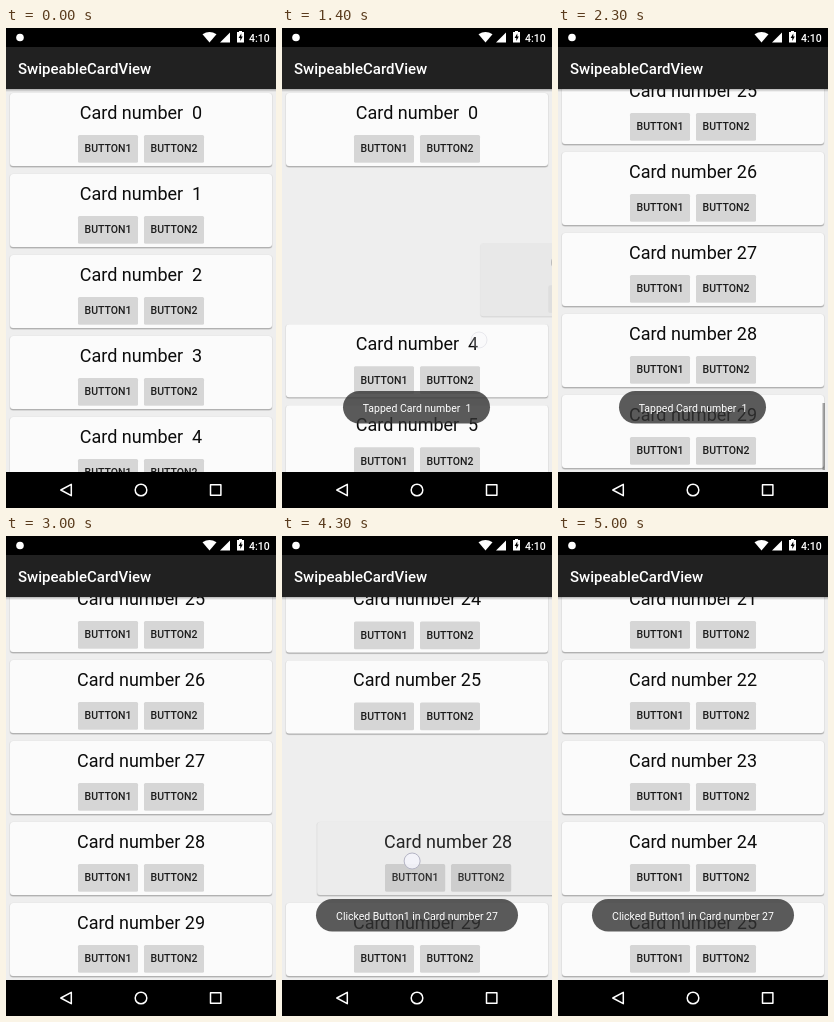
Recreate the animation shown at these times as an HTML page. Size 270 px wide and 480 px high, loop 5.3 s.

```html
<!DOCTYPE html>
<html lang="en">
<head>
<meta charset="utf-8">
<title>SwipeableCardView</title>
<style>
  html, body { margin: 0; width: 100%; height: 100%; overflow: hidden; background: #eee; }
  svg { display: block; width: 270px; height: 480px; }
  text { font-family: Roboto, "Noto Sans", sans-serif; white-space: pre; }
  .mid { text-anchor: middle; }
  .name { font-size: 18px; fill: #0c0c0c; }
  .btn { font-size: 10.5px; font-weight: 500; fill: #1c1c1c; }
  .bar { font-weight: 500; fill: #fff; }
  .toast { font-size: 10.5px; fill: #fff; }
</style>
</head>
<body>
<svg viewBox="0 0 270 480">
  <defs>
    <clipPath id="view"><rect y="61" width="270" height="383"/></clipPath>
    <linearGradient id="shade" x2="0" y2="1">
      <stop stop-opacity=".28"/><stop offset="1" stop-opacity="0"/>
    </linearGradient>
  </defs>
  <rect width="270" height="480" fill="#eee"/>
  <g clip-path="url(#view)">
    <g id="list"></g>
    <rect id="thumb" x="264.5" width="2.5" height="67" fill-opacity=".35"/>
  </g>

  <rect y="61" width="270" height="3" fill="url(#shade)"/>
  <rect y="19" width="270" height="42" fill="#212121"/>
  <text class="bar" x="12" y="46" font-size="15">SwipeableCardView</text>

  <rect width="270" height="19"/>
  <g fill="#fff">
    <circle cx="14" cy="9.5" r="3.8"/>
    <path d="M203.5 14.5 196.5 6.3Q203.5 1.6 210.5 6.3Z"/>
    <path d="M224 4.5V14.5H214Z"/>
    <path d="M233 4V3H236V4H238V14.5H231V4Z"/>
    <path d="M235.3 5.5 232.6 10H234.3V13L236.8 8.6H235.3Z" fill="#000"/>
  </g>
  <text class="bar" x="243" y="13.5" font-size="10.5">4:10</text>

  <rect y="444" width="270" height="36"/>
  <g fill="none" stroke="#fff" stroke-width="1.5" stroke-linejoin="round">
    <path d="M65.3 456.3V467.7L54.8 462Z"/>
    <circle cx="135" cy="462" r="5.8"/>
    <rect x="204.5" y="456.8" width="10.4" height="10.4"/>
  </g>

  <g id="toast">
    <rect y="363" height="32.5" rx="16.2" fill="#323232" fill-opacity=".8"/>
    <text class="toast mid" x="135" y="383.5"></text>
  </g>
  <circle id="finger" r="8" fill="#f4f4fc" fill-opacity=".85" stroke="#b4b4c4" stroke-width="1"/>
</svg>
<script>
const LOOP = 5300, PITCH = 81, COUNT = 30;
const SWIPE = 300, REST = 50, COLLAPSE = 200;
const $ = id => document.getElementById(id);
const clamp = v => Math.min(1, Math.max(0, v));

// card, swipe start, finger height
const swipes = [
  [1, 700, 190], [2, 1000, 195], [3, 1150, 312],
  [26, 3705, 168], [27, 3940, 245], [28, 4200, 325], [29, 4348, 404]
];
const scrollKeys = [[1700, 0], [1800, 60], [1900, 260], [2000, 690], [2100, 1170], [2200, 1590], [2300, 1804]];
const dragKeys = [[1650, 385], [1800, 325], [1900, 150]];
const pressKeys = [[200, 0], [300, .6], [400, 1]];
const buttonKeys = [[3100, 0], [3200, 1], [3300, 1], [3500, 0]];
const thumbKeys = [[1650, 0], [1800, 1], [2600, 1], [2900, 0]];
const toasts = [
  { text: "Tapped Card number  1", x: 61, w: 147, keys: [[400, 0], [500, .3], [600, .66], [700, 1], [2600, 1], [2800, 0]] },
  { text: "Clicked Button1 in Card number 27", x: 34, w: 202, keys: [[3300, 0], [3400, .3], [3500, .66], [3600, 1]] }
];

function track(keys, t) {
  if (t <= keys[0][0]) return keys[0][1];
  for (let i = 1; i < keys.length; i++) {
    const [a, x] = keys[i - 1], [b, y] = keys[i];
    if (t <= b) return x + (y - x) * (t - a) / (b - a);
  }
  return keys[keys.length - 1][1];
}

const button = (x, n) => `
  <rect x="${x}" y="42.8" width="60" height="27" rx="1.5" fill-opacity=".14"/>
  <rect x="${x}" y="42" width="60" height="27" rx="1.5" fill="#d6d6d6"/>
  <rect class="push" x="${x}" y="42" width="60" height="27" rx="1.5" fill-opacity="0"/>
  <text class="btn mid" x="${x + 30}" y="59.4">BUTTON${n}</text>`;

$("list").innerHTML = Array.from({ length: COUNT }, (_, i) => `
  <g>
    <rect class="under" x="4" width="262" height="74" rx="3"/>
    <g class="face">
      <rect x="3.3" y="-.2" width="263.4" height="75" rx="3.5" fill-opacity=".07"/>
      <rect x="4" y=".6" width="262" height="73.6" rx="3" fill-opacity=".2"/>
      <rect x="4" width="262" height="73" rx="3" fill="#fbfbfb"/>
      <text class="name mid" x="135" y="26">Card number ${String(i).padStart(2)}</text>
      ${button(72, 1)}${button(138, 2)}
      <rect class="press" x="4" width="262" height="73" rx="3"/>
    </g>
  </g>`).join("");

const cards = [...$("list").children].map(node => ({
  node,
  under: node.querySelector(".under"),
  face: node.querySelector(".face"),
  press: node.querySelector(".press"),
  push: node.querySelector(".push")
}));

function collapsed(start, t) {
  const u = clamp((t - start - SWIPE - REST) / COLLAPSE);
  return (1 - Math.cos(Math.PI * u)) / 2;
}

function cardTop(i, t, scroll) {
  let y = 65 + PITCH * i - scroll;
  for (const [k, start] of swipes) {
    const gap = PITCH * collapsed(start, t);
    if (k < 4 && k < i) y -= gap;      // lower cards close up
    if (k > 4 && k > i) y += gap;      // at the list end the upper ones come down
  }
  return y;
}

function showFinger(x, y, alpha) {
  $("finger").setAttribute("cx", x);
  $("finger").setAttribute("cy", y);
  $("finger").setAttribute("opacity", alpha);
}

function drawCards(t, scroll) {
  cards.forEach((c, i) => {
    const y = cardTop(i, t, scroll);
    const swipe = swipes.find(s => s[0] === i);
    const u = swipe ? clamp((t - swipe[1]) / SWIPE) : 0;
    const dx = 280 * u * u;
    const shown = y > -20 && y < 446 && dx < 270;
    c.node.style.display = shown ? "" : "none";
    if (!shown) return;
    const alpha = 1 - dx / 270;
    const press = u > 0 ? 1 : i === 1 ? track(pressKeys, t) : 0;
    c.node.setAttribute("transform", `translate(${dx} ${y})`);
    c.face.setAttribute("opacity", alpha);
    c.under.setAttribute("fill-opacity", .04 * (1 - alpha));
    c.press.setAttribute("fill-opacity", .06 * press);
    c.push.setAttribute("fill-opacity", i === 27 ? .12 * track(buttonKeys, t) : 0);
  });
}

function drawFinger(t) {
  showFinger(0, 0, 0);
  if (t >= 300 && t <= 400) showFinger(150, 190, .8);
  if (t >= 1700 && t <= 1900) showFinger(150, track(dragKeys, t), .8);
  if (t >= 3200 && t <= 3300) showFinger(100, 262, .8);
  for (const [, start, y] of swipes) {
    const u = (t - start) / SWIPE;
    if (u > 0 && u < .9) showFinger(99 + Math.min(280 * u * u, 98), y, clamp((.9 - u) / .25));
  }
}

function drawToast(t) {
  const item = toasts[t < 3000 ? 0 : 1];
  const [box, label] = $("toast").children;
  box.setAttribute("x", item.x);
  box.setAttribute("width", item.w);
  if (label.textContent !== item.text) label.textContent = item.text;
  $("toast").setAttribute("opacity", track(item.keys, t));
}

// The picture steps every 100 ms, with three longer holds.
function step(ms) {
  const t = Math.floor(ms / 100) * 100;
  if (t === 100) return 0;
  if (t === 3700) return 3600;
  return Math.min(t, 5000);
}

function draw(t) {
  const scroll = track(scrollKeys, t);
  drawCards(t, scroll);
  $("thumb").setAttribute("y", 61 + 314 * scroll / 1804);
  $("thumb").setAttribute("opacity", track(thumbKeys, t));
  drawToast(t);
  drawFinger(t);
}

const begin = performance.now();
let last = -1;
function tick() {
  const t = step((performance.now() - begin) % LOOP);
  if (t !== last) draw(last = t);
  requestAnimationFrame(tick);
}
tick();
</script>
</body>
</html>
```
